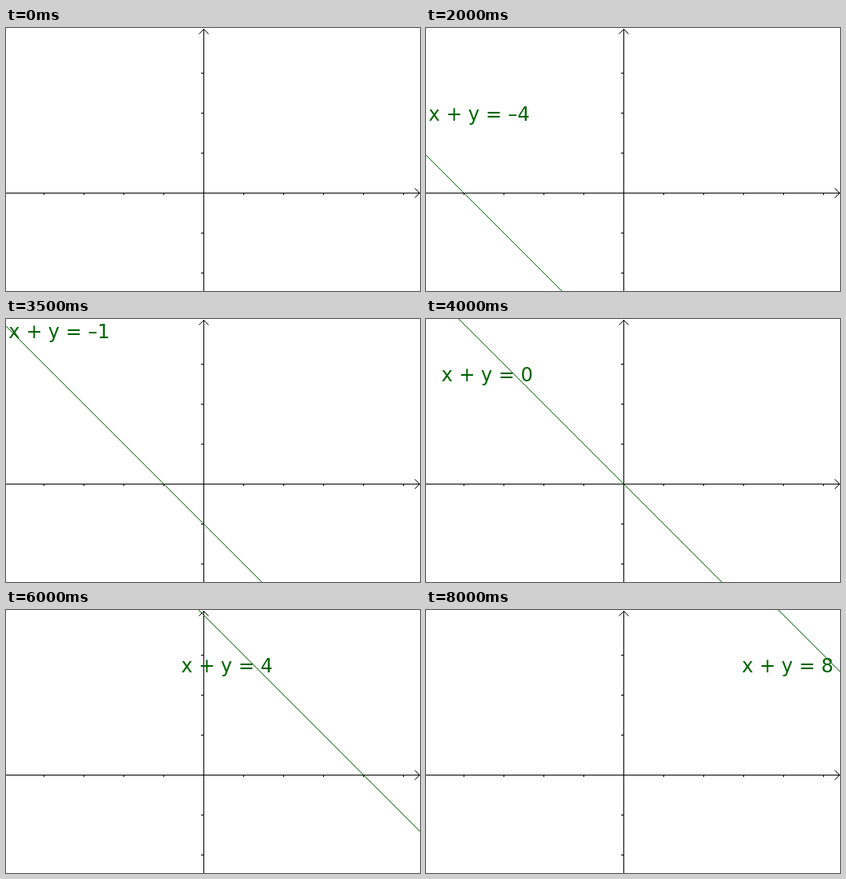
Recreate the animation shown at these times as an HTML page. Size 518 by 329 pixels, loop 8.5 s.

```html
<!DOCTYPE html>
<html lang="en">
<head>
<meta charset="utf-8">
<title>x + y = c</title>
<style>
  html, body { margin: 0; width: 100%; height: 100%; overflow: hidden; background: #fff; }
  svg { display: block; }
  path { fill: none; stroke-width: 1; }
  text { font: 24px "DejaVu Sans", sans-serif; fill: #006400; }
</style>
</head>
<body>
<svg width="518" height="329" viewBox="0 0 518 329">
  <path id="axes" stroke="#000"/>
  <path id="line" stroke="#006400"/>
  <text id="label"></text>
</svg>
<script>
const WIDTH = 518, HEIGHT = 329, UNIT = 50, OX = 247.5, OY = 206.5;
const STEP = 500, STEPS = 17;
const [axes, line, label] = ["axes", "line", "label"].map(id => document.getElementById(id));

function axesPath() {
  let d = `M0 ${OY}H${WIDTH}M${OX} 1V${HEIGHT}`;
  d += `M511.5 200.5L517.5 ${OY}L511.5 212.5M241.5 7.5L${OX} 1.5L253.5 7.5`;
  for (let i = -4; i <= 5; i++) if (i) d += `M${OX + i * UNIT} 207v2`;
  for (let i = -2; i <= 3; i++) if (i) d += `M247 ${OY - i * UNIT}h-3`;
  return d;
}

// The label follows the point where the line enters the view, kept inside the edges.
function labelPosition(c) {
  const top = OX - OY + c * UNIT;
  if (top >= 0) return [top + (top < WIDTH / 2 ? -21.7 : -45.7), 78];
  const left = -top;
  return [3.3, Math.max(24, left + (left < HEIGHT / 2 ? -43 : -67))];
}

function draw() {
  const step = Math.floor(performance.now() / STEP) % STEPS;
  const c = step - 8;
  const x = OX - OY + c * UNIT;
  line.setAttribute("d", `M${x - 400} -400L${x + 400} 400`);
  const [lx, ly] = labelPosition(c);
  label.setAttribute("x", lx);
  label.setAttribute("y", ly);
  label.textContent = step ? `x + y = ${c < 0 ? "–" : ""}${Math.abs(c)}` : "";
  requestAnimationFrame(draw);
}

axes.setAttribute("d", axesPath());
draw();
</script>
</body>
</html>
```
